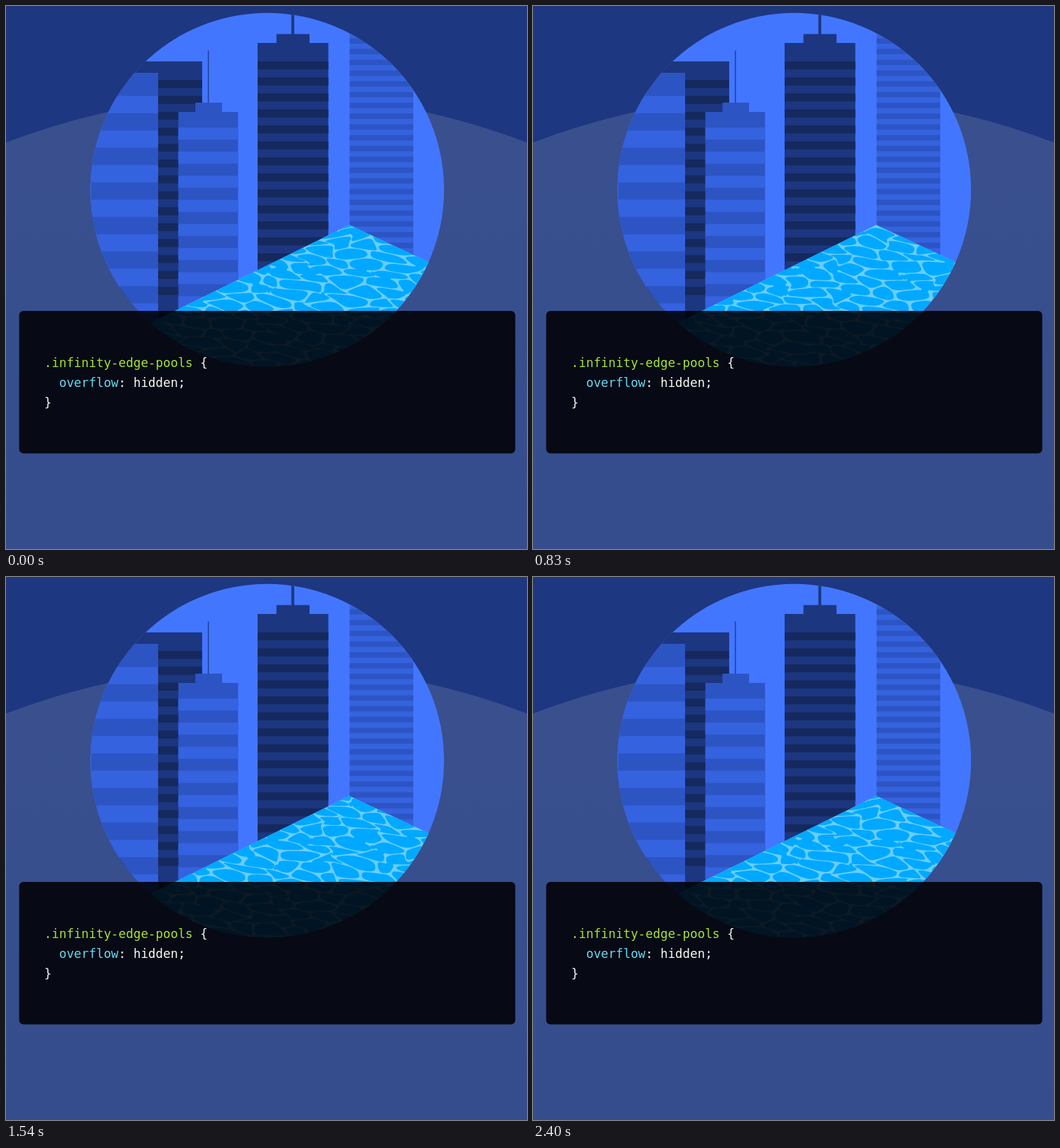
An HTML page for the animation above (2500 ms loop, 733 px wide and 764 px high).

```html
<!DOCTYPE html>
<html lang="en">
<head>
<meta charset="utf-8">
<title>Infinity edge pool</title>
<style>
  html, body { margin: 0; width: 100%; height: 100%; overflow: hidden; background: #1d3780; }
  svg { display: block; width: 100%; height: 100%; }
  text { font: 17.36px "Roboto Mono", "DejaVu Sans Mono", monospace; fill: #f8f8f2; white-space: pre; }
  .sel { fill: #a6e22e; }
  .prop { fill: #66d9ef; }
</style>
</head>
<body>
<svg viewBox="0 0 733 764">
  <defs>
    <linearGradient id="hill" x1="0" y1="125" x2="0" y2="764" gradientUnits="userSpaceOnUse">
      <stop offset="0" stop-color="#3a508e"/>
      <stop offset="1" stop-color="#354d8d"/>
    </linearGradient>
    <clipPath id="port"><circle cx="367.5" cy="258.5" r="248.8"/></clipPath>
    <clipPath id="pool"><path d="M483 308L200 447.5V520H640V381.5Z"/></clipPath>
  </defs>
  <rect width="733" height="764" fill="#1d3780"/>
  <circle cx="366.5" cy="1154.6" r="1030" fill="url(#hill)"/>
  <g clip-path="url(#port)">
    <rect x="110" width="520" height="520" fill="#4376ff"/>
    <g id="city"></g>
    <g clip-path="url(#pool)">
      <rect x="190" y="300" width="450" height="220" fill="#69cdff"/>
      <path id="cells" fill="#00a9ff"/>
      <path id="gaps" fill="none" stroke="#00a9ff" stroke-width="4" stroke-linecap="round"/>
    </g>
  </g>
  <rect x="18.5" y="429" width="698" height="200.5" rx="6" fill="#000105" fill-opacity=".88"/>
  <text x="53.8" y="508"><tspan class="sel">.infinity-edge-pools</tspan> {</text>
  <text x="74.7" y="536"><tspan class="prop">overflow</tspan>: hidden;</text>
  <text x="53.8" y="564">}</text>
</svg>
<script>
const $ = id => document.getElementById(id);
const LOOP = 2500, TAU = Math.PI * 2;
const NAVY = '#1c3680', INK = '#15295e', BLUE = '#2c55c3', BRIGHT = '#3562df';

const rect = (x, y, w, h, fill) =>
  `<rect x="${x}" y="${y}" width="${w}" height="${h}" fill="${fill}"/>`;

// A tower with floors repeating every `step` pixels from `first` to `last`.
function tower(x, top, w, wall, floor, first, step, last = 510) {
  let out = rect(x, top, w, 520 - top, wall);
  for (let y = first; y < last; y += step) out += rect(x, y, w, step / 2, floor);
  return out;
}

$('city').innerHTML =
  tower(160, 78, 116, NAVY, INK, 104, 22.4, 410) +
  tower(119.5, 94, 94.5, BLUE, BRIGHT, 126.5, 48.65) +
  rect(283.9, 62.5, 1.6, 74, '#2042a0') +
  rect(266.5, 136, 37.5, 14, BLUE) +
  tower(242.5, 149, 84, BLUE, BRIGHT, 171, 33.9) +
  rect(401.5, 5, 4, 36, NAVY) +
  rect(380.5, 39.5, 46.5, 13, NAVY) +
  tower(354, 52, 99.5, NAVY, INK, 78, 22.5) +
  tower(483.5, 30, 89.5, BRIGHT, BLUE, 30.1, 15.15);

const hash = (a, b, k) => {
  const v = Math.sin(a * 127.1 + b * 311.7 + k * 74.7) * 43758.5453;
  return v - Math.floor(v);
};

// Ripples: a jittered honeycomb whose corners drift on closed orbits.
const W = 41, H = 13.5;
const RING = [[0, -2], [1, -1], [1, 1], [0, 2], [-1, 1], [-1, -1]];

function corner(a, b, t) {
  const r = k => hash(a, b, k);
  const p1 = TAU * (t + r(1)), p2 = TAU * (2 * t + r(2));
  const x = 190 + a * W / 2 + (r(3) - .5) * 22 + 7 * Math.sin(p1) + 4 * Math.cos(p2);
  const y = 270 + b * H / 3 + (r(4) - .5) * 7 + 1.8 * Math.cos(p1) + 1.4 * Math.sin(p2);
  return [x + 5 * Math.sin(y / 19 + TAU * t), y + (x - 400) * .12 + 2 * Math.sin(x / 31 - TAU * t)];
}

const mix = (p, q, k) => [p[0] + (q[0] - p[0]) * k, p[1] + (q[1] - p[1]) * k];
const str = p => p[0].toFixed(1) + ' ' + p[1].toFixed(1);

function draw(t) {
  let cells = '', gaps = '';
  for (let j = -1; j < 21; j++) {
    for (let i = -1; i < 12; i++) {
      const a = 2 * i + (j & 1), b = 3 * j;
      const ring = RING.map(([dx, dy]) => corner(a + dx, b + dy, t));
      const c = ring.reduce((s, p) => [s[0] + p[0] / 6, s[1] + p[1] / 6], [0, 0]);
      const inner = ring.map((p, n) => mix(p, c, .04 + .09 * hash(a, b, 9 + n)));
      inner.forEach((p, n) => {
        const prev = inner[(n + 5) % 6], next = inner[(n + 1) % 6];
        cells += (n ? 'L' : 'M') + str(mix(p, prev, .42)) + 'Q' + str(p) + ' ' + str(mix(p, next, .42));
      });
      cells += 'Z';
      for (let n = 0; n < 3; n++) {
        if (hash(a, b, 6 + n) < .1) {
          gaps += 'M' + str(mix(ring[n], ring[n + 1], .3)) + 'L' + str(mix(ring[n], ring[n + 1], .7));
        }
      }
    }
  }
  $('cells').setAttribute('d', cells);
  $('gaps').setAttribute('d', gaps);
}

const start = performance.now();
function tick() {
  draw((performance.now() - start) % LOOP / LOOP);
  requestAnimationFrame(tick);
}
tick();
</script>
</body>
</html>
```
